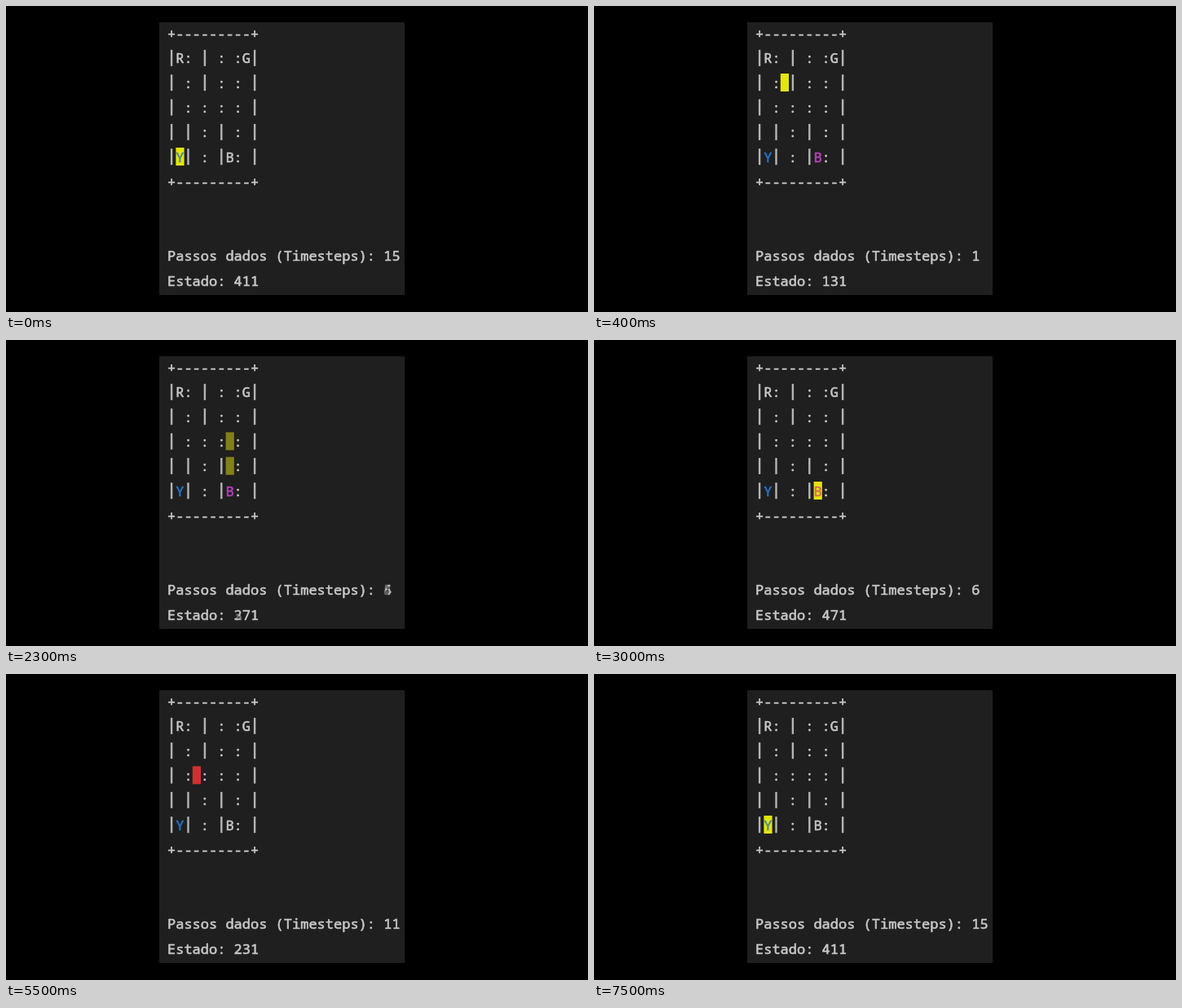
Recreate the animation shown at these times as an HTML page with a canvas. Size 714x376 px, loop 7.6 s.

```html
<!DOCTYPE html>
<html lang="pt">
<head>
<meta charset="utf-8">
<title>Taxi</title>
<style>
html, body { margin: 0; width: 714px; height: 376px; overflow: hidden; background: #000; }
canvas { display: block; }
</style>
</head>
<body>
<canvas id="stage" width="714" height="376"></canvas>
<script>
const W = 714, H = 376, LOOP = 7600;
const LEFT = 198, CELL = 10.2, BASE = 40, LINE = 30.35;
const COLOR = {
  panel: '#1f1f1f', text: '#c8c8c8', bar: '#b4b4b4', yellow: '#e5e510', red: '#cd3131',
  blue: '#2472c8', magenta: '#bc3fbc'
};
const MAP = [
  '+---------+',
  '|R: | : :G|',
  '| : | : : |',
  '| : : : : |',
  '| | : | : |',
  '|Y| : |B: |',
  '+---------+'
];
// Taxi row and column after each step; pick-up at 7, drop-off at 15
const PATH = ['11', '21', '22', '23', '33', '43', '43', '33', '23', '22', '21', '20', '30', '40', '40'];
const STARTS = [400, 900, 1400, 1900, 2400, 3000, 3500, 4000, 4500, 5000, 5500, 6000, 6500, 7000, 7500];
const PICKUP = 7, DROP = 15;

const view = document.getElementById('stage').getContext('2d');
const layer = Object.assign(document.createElement('canvas'), { width: W, height: H });
const ctx = layer.getContext('2d');

const colX = c => LEFT + c * CELL;
const rowY = r => BASE + r * LINE;
const isRiding = step => step >= PICKUP && step < DROP;

function glyph(ch, row, col, color) {
  if (ch === ' ') return;
  const x = colX(col), y = rowY(row);
  if (ch === '|') {
    ctx.fillStyle = COLOR.bar;
    ctx.fillRect(x + 3.9, y - 16.5, 2.4, 20);
    return;
  }
  ctx.fillStyle = ctx.strokeStyle = color;
  ctx.fillText(ch, x + CELL / 2, y);
  ctx.strokeText(ch, x + CELL / 2, y);
}

function line(text, row) {
  [...text].forEach((ch, col) => glyph(ch, row, col, COLOR.text));
}

function letterColor(ch, step, onTaxi) {
  if (ch === 'Y') return onTaxi && !isRiding(step) ? '#4f8a90' : COLOR.blue;
  if (ch === 'B' && step < PICKUP) return onTaxi ? '#d9685c' : COLOR.magenta;
  return COLOR.text;
}

function scene(step) {
  ctx.fillStyle = '#000';
  ctx.fillRect(0, 0, W, H);
  ctx.fillStyle = COLOR.panel;
  ctx.fillRect(188, 20, 301, 335);
  if (!step) return;
  const [r, c] = [...PATH[step - 1]].map(Number);
  const row = r + 1, col = 2 * c + 1;
  ctx.fillStyle = isRiding(step) ? COLOR.red : COLOR.yellow;
  ctx.fillRect(colX(col) + 0.2, rowY(row) - 17.7, CELL, 22);
  MAP.forEach((text, y) => [...text].forEach((ch, x) =>
    glyph(ch, y, x, letterColor(ch, step, y === row && x === col))));
  line('Passos dados (Timesteps): ' + step, 9);
  line('Estado: ' + ((r * 5 + c) * 20 + 11), 10);
}

function show(step, alpha = 1) {
  scene(step);
  view.globalAlpha = alpha;
  view.drawImage(layer, 0, 0);
}

function draw(t) {
  ctx.font = '17px "Noto Sans Mono", "DejaVu Sans Mono", monospace';
  ctx.textAlign = 'center';
  ctx.lineWidth = 0.6;
  ctx.lineJoin = 'round';
  const step = t < 200 ? DROP : STARTS.filter(s => s <= t).length;
  show(step);
  if (t >= 100 && t < 200) show(0, 0.5);
  if (t >= 2300 && t < 2400) show(step + 1, 0.5);
}

let start;
function tick(now) {
  start ??= now;
  draw((now - start) % LOOP);
  requestAnimationFrame(tick);
}
draw(0);
requestAnimationFrame(tick);
</script>
</body>
</html>
```
